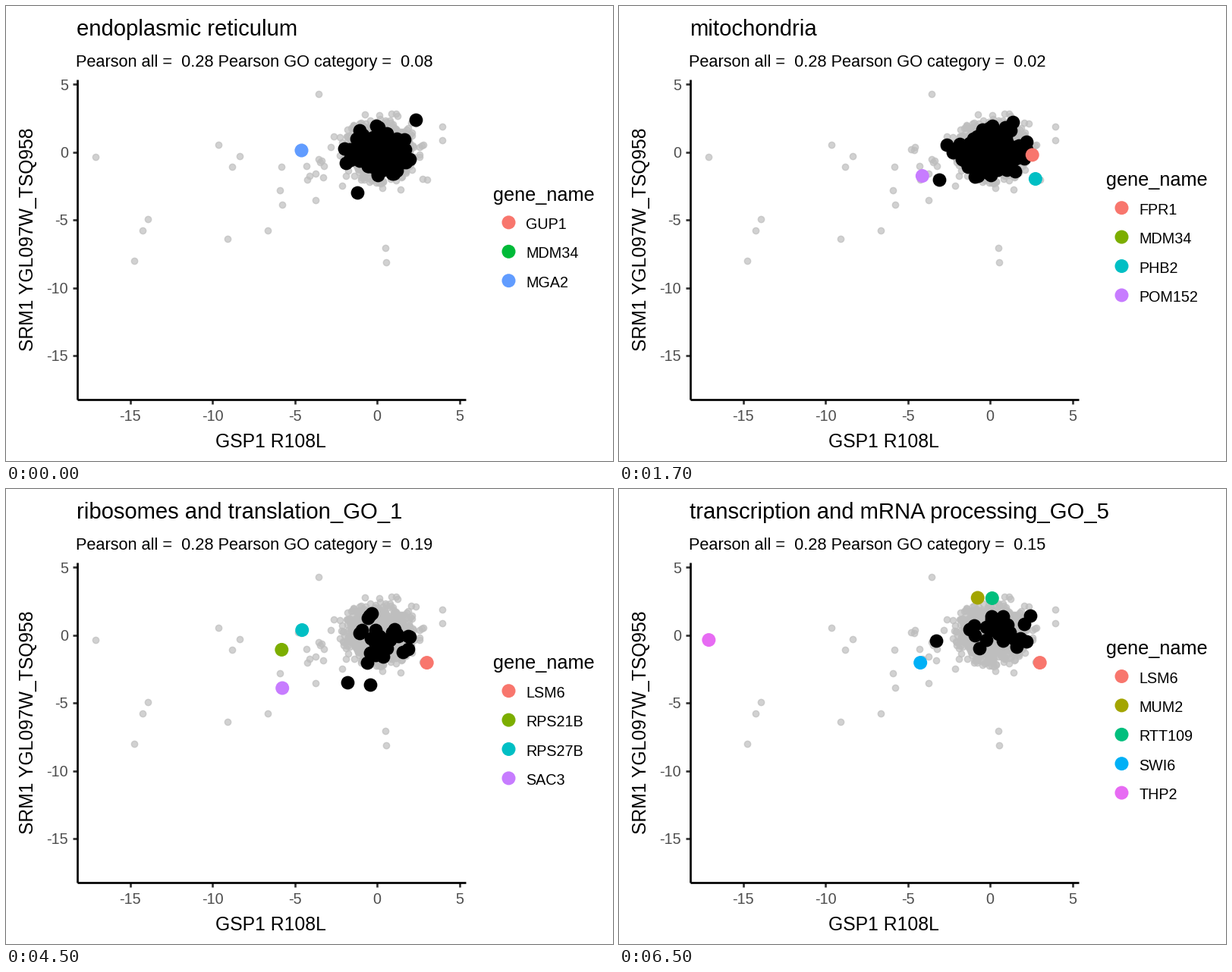
These frames come from a looping animation (800 by 600 pixels, 8 s). A matplotlib script:

```python
import numpy as np
import matplotlib.pyplot as plt
from matplotlib.animation import FuncAnimation

W, H, DPI = 800, 600, 100
PT = 72 / DPI
STEP = 500
LOW, HIGH = -18.23, 5.37  # both axes share these limits
plt.rcParams["font.family"] = "Liberation Sans"

HUES = {
    3: ["#F8766D", "#00BA38", "#619CFF"],
    4: ["#F8766D", "#7CAE00", "#00BFC4", "#C77CFF"],
    5: ["#F8766D", "#A3A500", "#00BF7D", "#00B0F6", "#E76BF3"],
}

# Genes with outlying values; any other gene lies outside the view
POSITIONS = {
    "MGA2": (-4.63, 0.16), "FPR1": (2.56, -0.2), "PHB2": (2.75, -1.97),
    "POM152": (-4.12, -1.75), "DPB4": (-5.92, -2.81), "ESC2": (2.79, 0.53),
    "NUP133": (-9.1, -6.39), "SEM1": (-14.77, -8.04), "LSM6": (3.02, -2.03),
    "RPS21B": (-5.8, -1.07), "RPS27B": (-4.56, 0.38), "SAC3": (-5.76, -3.9),
    "MUM2": (-0.76, 2.76), "RTT109": (0.12, 2.73), "SWI6": (-4.24, -2.03),
    "THP2": (-17.09, -0.35),
}
UNNAMED = [(-13.91, -4.96), (-14.23, -5.8), (-9.65, 0.55), (-8.82, -1.05),
           (-8.36, -0.29), (-6.65, -5.75), (0.49, -7.09), (0.53, -8.1),
           (-3.55, 4.27), (3.94, 1.89), (3.97, 0.91), (-3.75, -3.54)]


def to_px(points):
    """Data units to stage pixels."""
    return np.array([489.2, 192.8]) + np.asarray(points, float) * [21.7, -17.87]


def cloud(seed, n, center, sd, cutoff):
    """Normal scatter of exactly n points, truncated at cutoff deviations."""
    rng = np.random.default_rng(seed)
    u = (np.arange(n) + 0.5) / n
    r = np.sqrt(-2 * np.log(1 - u * (1 - np.exp(-cutoff ** 2 / 2))))
    angle = rng.uniform(0, 2 * np.pi, n)
    ring = np.column_stack([np.cos(angle), np.sin(angle)])
    return np.array(center) + r[:, None] * ring * sd


# title, category correlation, genes in the legend, cloud of members, far members
SCENES = [
    ("endoplasmic reticulum", "0.08", "GUP1 MDM34 MGA2",
     cloud(3, 130, (0.12, 0.05), (0.95, 0.82), 2.4), [(2.35, 2.42), (-1.2, -2.95)]),
    ("mitochondria", "0.02", "FPR1 MDM34 PHB2 POM152",
     cloud(5, 190, (0.1, 0.02), (1.0, 0.85), 2.4),
     [(-3.1, -2.03), (1.36, 2.22), (-2.65, 0.55)]),
    ("chromatin organization_GO_2", "0.82", "DPB4 ESC2 NUP133 SEM1",
     cloud(8, 31, (0.25, 0), (1.1, 0.95), 2.2),
     [(-2.28, -0.43), (2.03, 1.75), (-0.2, 2.28)]),
    ("ribosomes and translation_GO_1", "0.19", "LSM6 RPS21B RPS27B SAC3",
     cloud(9, 27, (0, 0.05), (1.15, 1.05), 2.1), [(-1.82, -3.5), (-0.44, -3.65)]),
    ("transcription and mRNA processing_GO_5", "0.15", "LSM6 MUM2 RTT109 SWI6 THP2",
     cloud(12, 26, (0.15, 0.2), (1.1, 0.85), 2.1), [(-3.3, -0.43), (2.45, 1.42)]),
]
SCHEDULE = [0] + [1] * 4 + [2] * 4 + [3] * 4 + [4] * 3

fig = plt.figure(figsize=(W / DPI, H / DPI), dpi=DPI, facecolor="white")
ax = fig.add_axes([0, 0, 1, 1])
ax.set(xlim=(0, W), ylim=(H, 0))
ax.axis("off")


def label(x, y, text="", px=19.8, color="black", **kw):
    return ax.text(x, y, text, fontsize=px * PT, color=color, va="baseline", **kw)


def line(xs, ys, color):
    ax.plot(xs, ys, color=color, lw=2.7 * PT, solid_capstyle="butt")


def dots(points, diameter, zorder, **kw):
    return ax.scatter(*np.transpose(points), s=(diameter * PT) ** 2, zorder=zorder, **kw)


# Axes
left, bottom = to_px((LOW, LOW))
right, top = to_px((HIGH, HIGH))
for value in range(-15, 6, 5):
    x, y = to_px((value, value))
    line([x, x], [bottom, bottom + 6], "#333333")
    line([left - 6, left], [y, y], "#333333")
    label(x, 547, str(value), color="#4D4D4D", ha="center")
    label(82, y + 7.2, str(value), color="#4D4D4D", ha="right")
line([left, left], [top, bottom], "black")
line([left, right], [bottom, bottom], "black")
label(349, 582, "GSP1 R108L", 24.7, ha="center")
label(36, 307.5, "SRM1 YGL097W_TSQ958", 24.7, ha="center", rotation=90,
      rotation_mode="anchor")

# Points
strays = np.random.default_rng(4).uniform((-6, -2.1), (-3.2, 0.8), (8, 2))
grey = np.vstack([
    cloud(11, 1000, (0.08, 0.12), (0.98, 0.95), 2.6),
    cloud(2, 70, (0.1, 0.1), (1.3, 1.6), 2.4),
    strays, UNNAMED, list(POSITIONS.values())])
dots(to_px(grey), 8.3, 3, color="#BEBEBE", alpha=0.7, linewidths=1.4 * PT)
members = dots([(0, 0)], 17.8, 4, color="black", linewidths=0)
named = dots([(0, 0)], 18, 5, color="black", linewidths=0)
keys = dots([(0, 0)], 18, 5, color="black", linewidths=0)

# Changing text
title = label(92.8, 39, px=29.2)
subtitle = label(92.4, 80, px=21.8)
legend_title = label(642, 256, "gene_name", 25.2)
gene_labels = [label(685.2, 0) for _ in range(5)]


def update(i):
    name, score, genes, core, far = SCENES[SCHEDULE[i]]
    genes = genes.split()
    hues = HUES[len(genes)]
    title.set_text(name)
    subtitle.set_text(f"Pearson all =  0.28 Pearson GO category =  {score}")
    members.set_offsets(to_px(np.vstack([core, far])))

    shown = [(POSITIONS[g], hue) for g, hue in zip(genes, hues) if g in POSITIONS]
    named.set_offsets(to_px([pos for pos, _ in shown]))
    named.set_facecolor([hue for _, hue in shown])

    first = 285.4 - 19.2 * (len(genes) - 3)
    rows = first + 38.4 * np.arange(len(genes))
    legend_title.set_y(first - 28.9)
    keys.set_offsets([(662.5, y) for y in rows])
    keys.set_facecolor(hues)
    for k, text in enumerate(gene_labels):
        text.set_text(genes[k] if k < len(genes) else "")
        text.set_y(first + 38.4 * k + 8.6)
    return []


anim = FuncAnimation(fig, update, frames=len(SCHEDULE), init_func=lambda: update(0),
                     interval=STEP, repeat=True, repeat_delay=0, blit=False)
plt.show()
```
